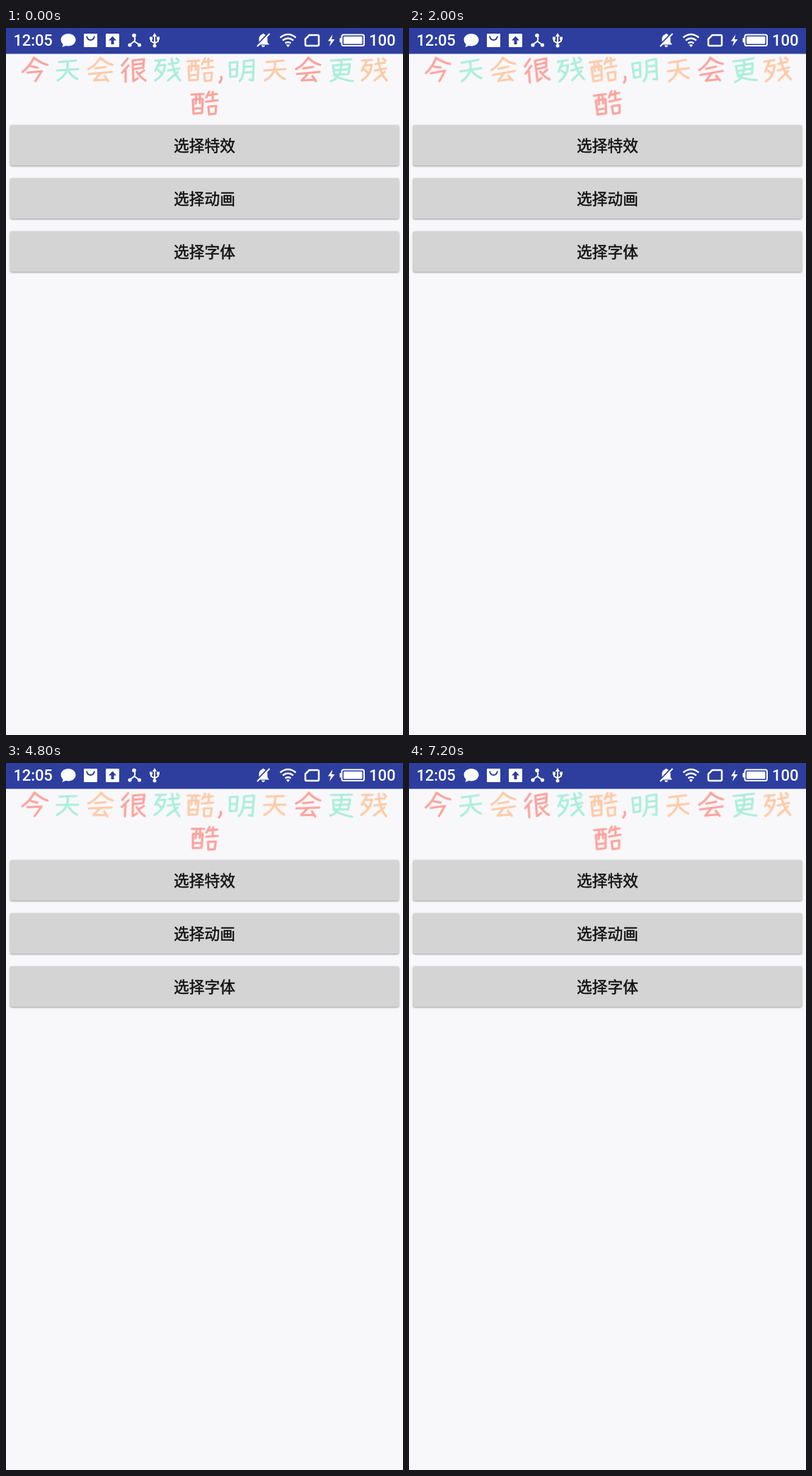
An HTML page for the animation above (7.24 s loop, 561 px wide and 998 px high).

```html
<!DOCTYPE html>
<html lang="zh-CN">
<head>
<meta charset="utf-8">
<title>文字动画</title>
<style>
html, body { margin: 0; width: 100%; height: 100%; overflow: hidden; background: #f8f8fa; }
.stage { position: relative; width: 561px; height: 998px; overflow: hidden; }
svg { position: absolute; left: 0; top: 0; }
.bar text { font: 500 22px Roboto, sans-serif; fill: #fff; }
.solid { fill: #fff; }
.line { fill: none; stroke: #fff; stroke-width: 2; }
.bold { stroke-width: 2.5; }
.cut { fill: none; stroke: #2d3e9f; stroke-width: 1.8; }
.btn {
  position: absolute; left: 6px; width: 549px; height: 57px; border-radius: 2px;
  background: #d4d4d4; box-shadow: 0 1px 3px rgba(0, 0, 0, .4); color: #111;
  font: 500 21.7px/56px "Noto Sans CJK SC", "Noto Sans CJK", sans-serif; text-align: center;
  -webkit-text-stroke: .5px #111;
}
.glyph {
  fill: none; stroke-width: 3.2; stroke-linecap: round; stroke-linejoin: round;
  transform-origin: 0 -3px; animation: sway 7240ms linear infinite;
}
.signal { animation: signal 7240ms step-end infinite; }
@keyframes sway {
  0% { transform: rotate(0deg); }
  7.7% { transform: rotate(-.5deg); animation-timing-function: ease-in-out; }
  18% { transform: rotate(-7deg); animation-timing-function: ease-in; }
  27.6% { transform: rotate(-5deg); }
  33% { transform: rotate(1deg); }
  42% { transform: rotate(5.5deg); animation-timing-function: ease-out; }
  53.6% { transform: rotate(8deg); animation-timing-function: ease-in; }
  61% { transform: rotate(6.5deg); }
  79% { transform: rotate(-5deg); animation-timing-function: ease-out; }
  87% { transform: rotate(-6.5deg); animation-timing-function: ease-in-out; }
  99.4%, 100% { transform: rotate(-2.5deg); }
}
@keyframes signal {
  0% { opacity: 0; }
  53.4% { opacity: 1; }
  60% { opacity: 0; }
}
</style>
</head>
<body>
<div class="stage">
  <svg class="bar" width="561" height="37">
    <rect width="561" height="36.5" fill="#2d3e9f"/>
    <text x="10.5" y="25" letter-spacing="-.15">12:05</text>
    <!-- notifications -->
    <path class="solid" d="M88 8C94 8 98.500 12 98.500 16.700S94 25.500 88 25.500L84.500 25L79.500 27L80.500 23Q77.500 20.500 77.500 16.700C77.500 12 82 8 88 8Z"/>
    <rect class="solid" x="110" y="8" width="19" height="19" rx="1"/>
    <path class="cut" d="M114 11.500Q115 17 119.500 17T125 11.500"/>
    <rect class="solid" x="141" y="8" width="19" height="19" rx="1"/>
    <path d="M150.500 11.500L156 17.500H152.500V23H148.500V17.500H145Z" fill="#2d3e9f"/>
    <path class="line" d="M181.500 11Q183 17 181 19L175 23.500M181 18.500L188 23.500"/>
    <circle class="solid" cx="181" cy="10.500" r="2.800"/>
    <circle class="solid" cx="175" cy="24" r="2.600"/>
    <circle class="solid" cx="188.500" cy="24" r="2.600"/>
    <path class="line" d="M210 11V25M205 14V18.500L210 21.500L215 18.500V14"/>
    <path class="solid" d="M210 7L213 12H207ZM203 12.500H207V16.500H203ZM213 12.500H217V16.500H213Z"/>
    <circle class="solid" cx="210" cy="25" r="2.500"/>
    <!-- bell -->
    <path class="solid" d="M355 23.500L357.500 20V15Q358 10 362 9Q363.500 6.500 365 9Q369 10 369.500 15V20L372 23.500ZM361 24.500H366Q365.500 27 363.500 27T361 24.500Z"/>
    <path class="cut" d="M354.500 24L371 7"/>
    <path class="line" d="M355 26L372.500 8"/>
    <!-- wifi -->
    <path class="line bold" d="M387.500 13.500Q398.500 4.500 409.500 13.500M391 17.500Q398.500 11.500 406 17.500M394.500 21.500Q398.500 18.500 402.500 21.500"/>
    <path class="solid" d="M395.800 24Q398.500 22 401.200 24L398.500 27Z"/>
    <path class="signal solid" d="M406 20.500H408V23.500H410L407 27L404 23.500H406Z"/>
    <!-- sim, charge, battery -->
    <path class="line bold" d="M428.500 10H440.500Q442 10 442 11.500V23.500Q442 25 440.500 25H424.500Q423 25 423 23.500V15.500Z"/>
    <path class="solid" d="M461.500 9L455 18.500H459L457 26L464.500 16H460Z"/>
    <rect class="line" x="474.500" y="9.500" width="31.500" height="15.500" rx="2.500"/>
    <rect class="solid" x="477" y="12" width="26.500" height="10.500" rx="1"/>
    <rect class="solid" x="471.500" y="14" width="2.500" height="6.500" rx="1"/>
    <text x="513" y="25">100</text>
  </svg>
  <svg id="title" width="561" height="135" role="img" aria-label="今天会很残酷,明天会更残酷"></svg>
  <div class="btn" style="top:137px">选择特效</div>
  <div class="btn" style="top:212px">选择动画</div>
  <div class="btn" style="top:287px">选择字体</div>
</div>
<script>
// Handwritten strokes, drawn around the middle of each character
const strokes = {
  今: "M-2-17Q-8-5-18 3M-2-17Q8-9 17-7M-6-5L3-3M-11 4L9 2L0 16",
  天: "M-12-11L12-13M-15 1L15-1M0-11Q2 6-14 15M2 3Q7 10 14 13",
  会: "M0-17Q-7-6-17-1M0-17Q8-9 17-7M-7-2L7-4M-16 6L16 3M-1 6L-9 15L9 14M6 9L11 16",
  很: "M-9-16L-17-6M-8-6L-17 4M-12 1V17M-2-13L14-15L13-3L-1-1M-1-7L12-9M-2-13L-1 16L5 12M14 1L7 6M4 3Q9 11 16 15",
  残: "M-17-13L-3-14M-10-13L-17 1M-12-6L-3-7Q-5 8-17 15M-13 0L-9 4M2-8L15-10M1 1L17-2M6-16Q8 5 18 15M15 3L1 15M13-16L16-13",
  酷: "M-19-12L-2-13M-17-5L-3-6L-4 14L-16 15ZM-12-12L-13 1M-7-13V0M-15 8L-5 7M6-16L2-8M5-11L17-13M11-16V-3M2-2L18-4M5 5L16 4L15 15L6 16Z",
  明: "M-17-10L-6-11L-7 9L-16 10ZM-16 0L-7-1M3-12L17-14L16 15L11 14M3-12Q4 10-3 16M3-4L16-5M3 4L15 3",
  更: "M-15-13L14-15M-12-6L12-8L10 6L-10 7ZM-11 1L11-1M0-13Q1 11-15 16M-10 8Q0 14 16 16",
  ",": "M0 10Q2 13-2 18"
};
const colors = ["#fca29c", "#abeed9", "#fdcaa8"];
const text = "今天会很残酷,明天会更残酷";
const xs = [41.5, 87, 133.5, 181, 228, 275, 304, 333, 380, 427, 474, 520, 281];
const title = document.getElementById("title");

function add(parent, name, attrs) {
  const node = document.createElementNS("http://www.w3.org/2000/svg", name);
  for (const key in attrs) node.setAttribute(key, attrs[key]);
  return parent.appendChild(node);
}

[...text].forEach((char, i) => {
  const y = i < text.length - 1 ? 59 : 106;
  const place = add(title, "g", { transform: `translate(${xs[i]} ${y})` });
  add(place, "path", { class: "glyph", d: strokes[char], stroke: colors[i % 3] });
});
</script>
</body>
</html>
```
